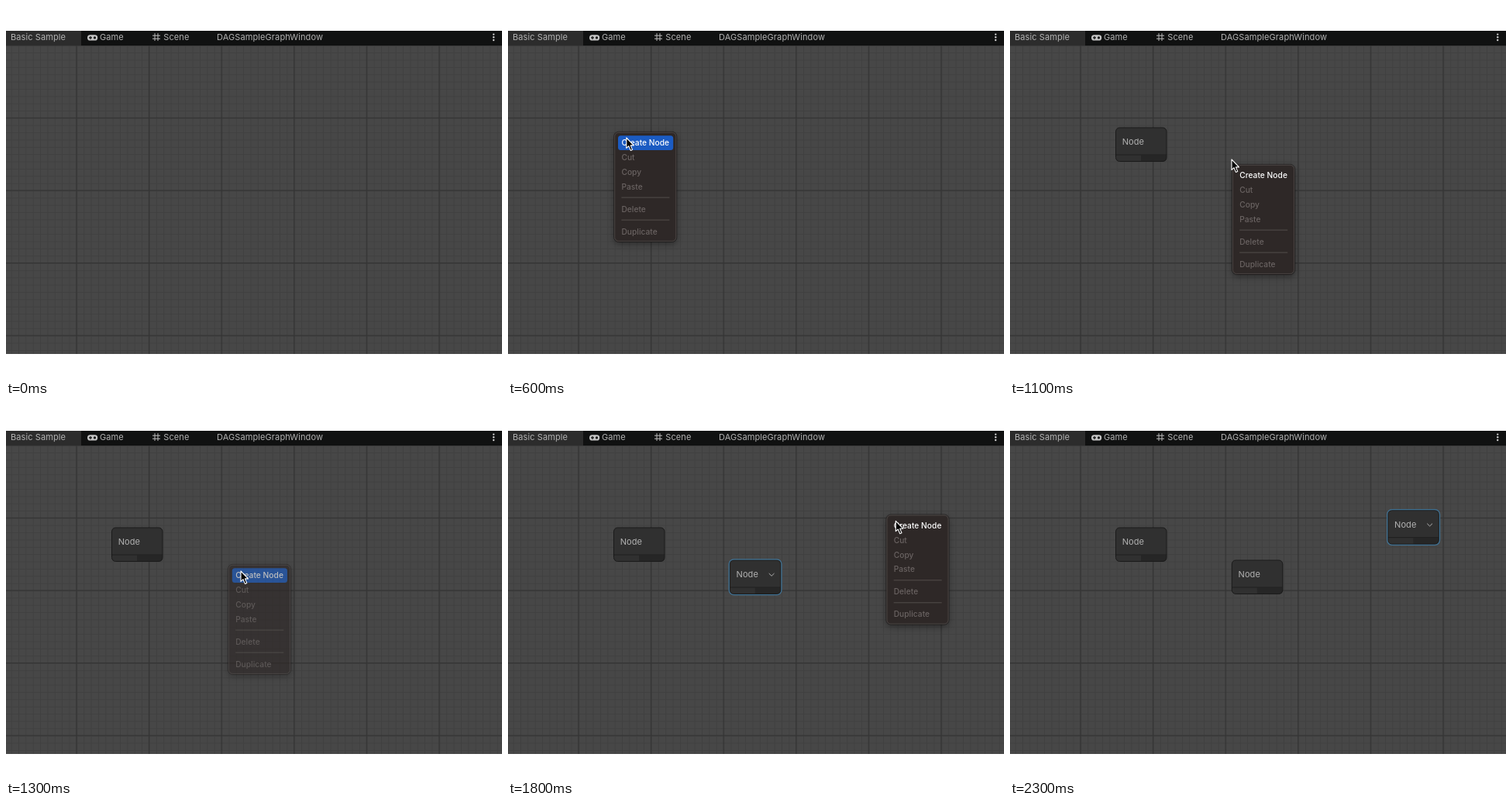
These frames come from a looping animation (640x480 px, 2400 ms). An HTML page:

```html
<!DOCTYPE html>
<html lang="en">
<head>
<meta charset="utf-8">
<title>Creating graph nodes</title>
<style>
  html, body { margin: 0; width: 100%; height: 100%; overflow: hidden; background: #fff; }
  svg { display: block; width: 640px; height: 480px; }
  text { font-family: Inter, Roboto, sans-serif; font-size: 11px; letter-spacing: .1px; fill: #b2b2b2; }
  .menu text { font-size: 10.2px; font-weight: 500; letter-spacing: .04px; fill: #6a6362; }
  .menu .on { fill: #fff; }
  .menu .panel { fill: #2e2827; stroke: #494341; filter: drop-shadow(0 3px 4px rgba(0, 0, 0, .4)); }
  .menu .rim { fill: none; stroke: #262322; stroke-width: .8; }
  .rule { stroke: #534d4b; stroke-width: 1; }
  .glow { fill: none; stroke: #3f7193; stroke-width: 1.3; }
  .chevron { fill: none; stroke: #b0b0b0; stroke-width: 1; }
</style>
</head>
<body>
<svg viewBox="0 0 640 480">
  <defs>
    <pattern id="fine" x="90.9" y="144.4" width="9.36" height="9.36" patternUnits="userSpaceOnUse">
      <path d="M.5 0V9.36M0 .5H9.36" stroke="#404040" stroke-width="1"/>
    </pattern>
    <pattern id="coarse" x="90.3" y="143.8" width="93.6" height="93.6" patternUnits="userSpaceOnUse">
      <path d="M.7 0V93.6M0 .7H93.6" stroke="#343434" stroke-width="1.3"/>
    </pattern>
    <g id="node">
      <rect x=".5" y=".5" width="65.5" height="43.5" rx="5" fill="#303030"/>
      <path d="M33 36H66V39.5Q66 44 61.5 44H33Z" fill="#262626"/>
      <path d="M.5 35.5H66" stroke="#1e1e1e"/>
      <rect x=".5" y=".5" width="65.5" height="43.5" rx="5" fill="none" stroke="#1a1a1a"/>
      <text x="8.7" y="22.6">Node</text>
    </g>
    <g id="hover">
      <rect class="glow" x="-.6" y="-.6" width="67.8" height="45.7" rx="6"/>
      <path class="chevron" d="M50.9 17.5l3.4 3.3 3.4-3.3"/>
    </g>
  </defs>

  <rect y="32" width="640" height="417" fill="#474747"/>
  <rect y="51" width="640" height="398" fill="url(#fine)"/>
  <rect y="51" width="640" height="398" fill="url(#coarse)"/>

  <rect y="32" width="640" height="19" fill="#101111"/>
  <rect y="32" width="97" height="19" fill="#2c2c2c"/>
  <text x="6" y="44.4">Basic Sample</text>
  <rect x="105" y="37.3" width="13.2" height="7.2" rx="3.6" fill="#c4c4c4"/>
  <path d="M107 40.9h4M109 38.9v4" stroke="#101111" stroke-width="1.2"/>
  <circle cx="114.5" cy="40.9" r="1.6" fill="#101111"/>
  <text x="121" y="44.4">Game</text>
  <path d="M192 35.2v9.8M196 35.2v9.8M189 38.2h10M189 42.2h10" stroke="#bcbcbc"/>
  <text x="203.3" y="44.4">Scene</text>
  <text x="272" y="44.4">DAGSampleGraphWindow</text>
  <g fill="#c8c8c8">
    <circle cx="629.2" cy="36.6" r="1.2"/>
    <circle cx="629.2" cy="40.3" r="1.2"/>
    <circle cx="629.2" cy="44" r="1.2"/>
  </g>

  <g id="nodes"></g>

  <g id="menu" class="menu">
    <rect class="rim" x="-.6" y="-.6" width="81.2" height="142.2" rx="6"/>
    <rect class="panel" x=".5" y=".5" width="79" height="140" rx="5"/>
    <rect id="pick" x="4.8" y="4.4" width="71.2" height="18.6" rx="3.5" fill="#1b5bc2"/>
    <text class="on" x="9.2" y="17.6">Create Node</text>
    <text x="9.2" y="36.4">Cut</text>
    <text x="9.2" y="55.1">Copy</text>
    <text x="9.2" y="73.8">Paste</text>
    <path class="rule" d="M9.2 84.2H71.2M9.2 113.2H71.2"/>
    <text x="9.2" y="102.8">Delete</text>
    <text x="9.2" y="131.9">Duplicate</text>
  </g>

  <path id="cursor" d="M0 0V13.4L3 10.7L5.4 16.4L7.7 15.4L5.4 9.9H9.5Z" fill="#000" stroke="#fff" stroke-width="1.1" stroke-linejoin="round"/>
</svg>
<script>
  const STEP = 100, STEPS = 24;
  const $ = id => document.getElementById(id);

  // All times are in steps of 100 ms.
  const rounds = [
    { x: 136, y: 156.5, open: 3, pick: 5, fade: 7, made: 9, hover: [9, 10] },
    { x: 285.8, y: 198.5, open: 11, pick: 12, fade: 13, made: 15, hover: [16, 22] },
    { x: 487.3, y: 134.2, open: 17, pick: 19, fade: 21, made: 23, hover: [23, 24] }
  ];

  // step, x, y
  const path = [
    [1, 128, 150], [2, 136, 156], [3, 136, 156], [5, 151, 169], [6, 152.8, 170],
    [7, 180, 171], [8, 262.6, 170.5], [9, 283, 190], [10, 286, 198], [11, 286, 198],
    [12, 299, 211], [13, 303, 213], [14, 400, 169], [15, 470.3, 139], [16, 486, 133.5],
    [17, 487.5, 134], [18, 500.3, 148.3], [19, 503, 151], [22, 503, 151]
  ];

  const place = (el, x, y) => el.setAttribute('transform', `translate(${x} ${y})`);
  const show = (el, on) => el.style.display = on ? '' : 'none';

  function add(parent, name, href) {
    const el = document.createElementNS('http://www.w3.org/2000/svg', name);
    if (href) el.setAttribute('href', href);
    return parent.appendChild(el);
  }

  for (const r of rounds) {
    r.el = add($('nodes'), 'g');
    place(r.el, r.x, r.y);
    add(r.el, 'use', '#node');
    r.glow = add(r.el, 'use', '#hover');
  }

  function cursorAt(s) {
    const i = path.findIndex(p => p[0] >= s);
    if (i < 1) return path[0].slice(1);
    const [a, x0, y0] = path[i - 1], [b, x1, y1] = path[i];
    const k = (s - a) / (b - a);
    return [x0 + (x1 - x0) * k, y0 + (y1 - y0) * k];
  }

  function draw(s) {
    for (const r of rounds) {
      show(r.el, s >= r.made);
      show(r.glow, s >= r.hover[0] && s <= r.hover[1]);
    }
    const r = rounds.find(r => s >= r.open && s < r.made);
    show($('menu'), r);
    if (r) {
      place($('menu'), r.x + 1.2, r.y + 6.4);
      $('menu').style.opacity = s < r.fade ? 1 : s === r.fade ? .65 : .22;
      show($('pick'), s >= r.pick);
    }
    const visible = s >= 1 && s <= 22;
    show($('cursor'), visible);
    if (visible) place($('cursor'), ...cursorAt(s));
  }

  const start = performance.now();
  function tick() {
    draw(Math.floor((performance.now() - start) / STEP) % STEPS);
    requestAnimationFrame(tick);
  }
  tick();
</script>
</body>
</html>
```
